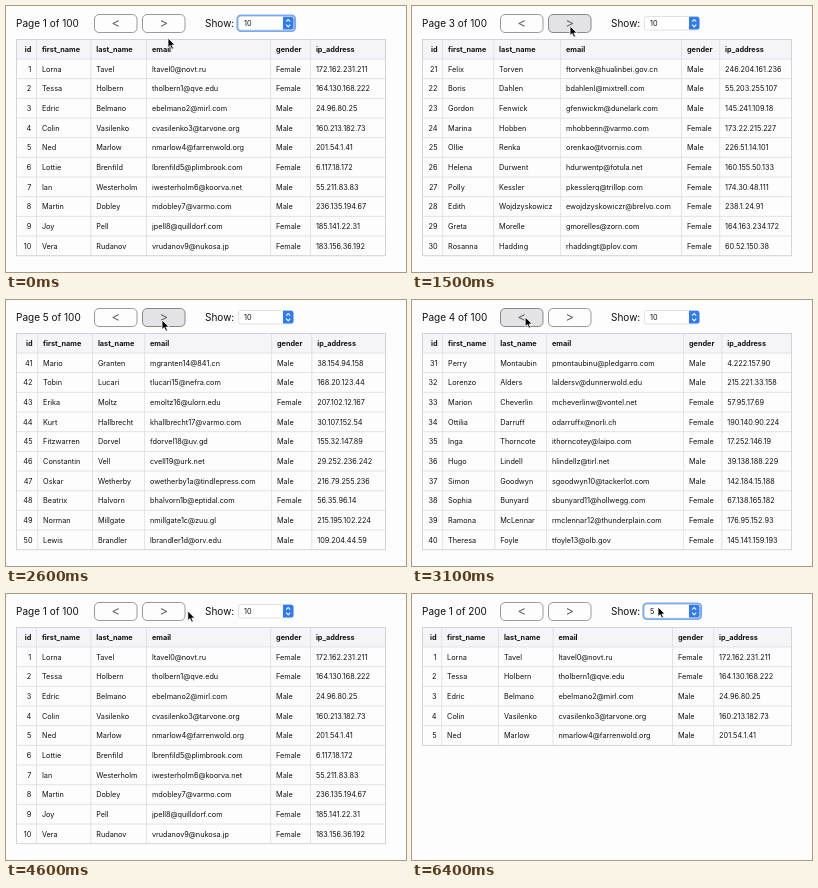
Animation, 400 px wide and 266 px high, one loop 6.5 s. Source, as an HTML page:

```html
<!DOCTYPE html>
<html lang="en">
<head>
<meta charset="utf-8">
<title>Paginated table</title>
<style>
  html, body { margin: 0; width: 100%; height: 100%; overflow: hidden; background: #fdfdfe; }
  svg { display: block; width: 100%; height: 100%; font: 7.3px Inter, "Open Sans", sans-serif; fill: #111; }
  .caption { font-size: 10px; }
  .head { font-weight: 700; }
  .end { text-anchor: end; }
  .button rect { fill: #fdfdfe; stroke: #9a9a9c; }
  .button text { font-size: 13px; fill: #606064; text-anchor: middle; }
  .button.hover rect { fill: #e3e3e5; stroke: #88888b; }
  .grid { fill: none; stroke: #dcdce0; stroke-width: .8; }
  .frame { fill: none; stroke: #cfcfd4; stroke-width: .9; }
</style>
</head>
<body>
<svg viewBox="0 0 400 266" xmlns="http://www.w3.org/2000/svg">
  <text id="counter" class="caption" x="10" y="20.5"></text>
  <g id="prev" class="button"><rect x="88.5" y="8.5" width="42.5" height="18" rx="4.5"/><text x="109.7" y="21.7">&lt;</text></g>
  <g id="next" class="button"><rect x="136.5" y="8.5" width="42.5" height="18" rx="4.5"/><text x="157.7" y="21.7">&gt;</text></g>
  <text class="caption" x="199" y="20.5">Show:</text>
  <rect id="ring" x="231.5" y="9.5" width="57.5" height="15.5" rx="3.5" fill="none" stroke="#79aaf2" stroke-width="2.2"/>
  <rect id="select" x="232.5" y="10.5" width="55" height="13.5" rx="2.5" fill="#fff" stroke="#d6d6da" stroke-width=".7"/>
  <path d="M277 10.8h8q2.4 0 2.4 2.4v8q0 2.4-2.4 2.4h-8z" fill="#2f7cf2"/>
  <path d="M280.2 15.7l2-2.2 2 2.2M280.2 18.7l2 2.2 2-2.2" fill="none" stroke="#fff" stroke-width="1.1"/>
  <text id="size" x="238" y="19.9"></text>
  <g id="tables"></g>
  <path id="cursor" d="M0 0V9.6L2.2 7.6 3.8 11.2 5.5 10.4 3.9 7H7z" fill="#000" stroke="#fff" stroke-width=".8"/>
</svg>
<script>
const LOOP = 6500, TOP = 33.5, HEAD = 19.5, PITCH = 19.67, LEFT = 10.5, RIGHT = 379.5;
const $ = id => document.getElementById(id);

// Column dividers, then records: first name, last name, mail domain, gender, address
const pages = {
  1: [[30.5, 84.8, 140.5, 264.7, 304.5], `
Lorna Tavel novt.ru F 172.162.231.211
Tessa Holbern qve.edu F 164.130.168.222
Edric Belmano mirl.com M 24.96.80.25
Colin Vasilenko tarvone.org M 160.213.182.73
Ned Marlow farrenwold.org M 201.54.1.41
Lottie Brenfild plimbrook.com F 6.117.18.172
Ian Westerholm koorva.net M 55.211.83.83
Martin Dobley varmo.com M 236.135.194.67
Joy Pell quilldorf.com F 185.141.22.31
Vera Rudanov nukosa.jp F 183.156.36.192`],
  2: [[30.5, 85, 144, 268, 307], `
Clara Winslade porrin.com F 84.17.203.66
Piers Hollow tandrel.org M 191.44.120.8
Nora Castell umbrio.net F 23.165.78.204
Jonas Pettigan lovask.com M 140.92.16.133
Ingrid Farlow stellop.com F 208.31.177.52
Hector Munday brindolf.org M 62.219.104.90
Leona Starkey ganvil.edu F 117.8.243.165
Rupert Oswick corvelle.com M 175.126.39.81
Silvia Barton mendrop.net F 49.200.151.17
Conrad Thayler fennolo.com M 221.73.14.248`],
  3: [[30.7, 81.7, 148.6, 269.6, 307.7], `
Felix Torven hualinbei.gov.cn M 246.204.161.236
Boris Dahlen mixtrell.com M 55.203.255.107
Gordon Fenwick dunelark.com M 145.241.109.18
Marina Hobben varmo.com F 173.22.215.227
Ollie Renka tvornis.com M 226.51.14.101
Helena Durwent fotula.net F 160.155.50.133
Polly Kessler trillop.com F 174.30.48.111
Edith Wojdzyskowicz brelvo.com F 238.1.24.91
Greta Morelle zorn.com F 164.163.234.172
Rosanna Hadding plov.com F 60.52.150.38`],
  4: [[30.7, 82.8, 134.6, 271.6, 309.8], `
Perry Montaubin pledgarro.com M 4.222.157.90
Lorenzo Alders dunnerwold.edu M 215.221.33.158
Marion Cheverlin vontel.net F 57.95.17.69
Ottilia Darruff norli.ch F 190.140.90.224
Inga Thorncote laipo.com F 17.252.146.19
Hugo Lindell tirl.net M 39.138.188.229
Simon Goodwyn tackerlot.com M 142.184.15.188
Sophia Bunyard hollwegg.com F 67.138.165.182
Ramona McLennar thunderplain.com F 176.95.152.93
Theresa Foyle olb.gov F 145.141.159.193`],
  5: [[31.7, 86.5, 138.6, 265.6, 305.8], `
Mario Granten 841.cn M 38.154.94.158
Tobin Lucari nefra.com M 168.20.123.44
Erika Moltz ulorn.edu F 207.102.12.167
Kurt Hallbrecht varmo.com M 30.107.152.54
Fitzwarren Dorvel uv.gd M 155.32.147.89
Constantin Vell urk.net M 29.252.236.242
Oskar Wetherby tindlepress.com M 216.79.255.236
Beatrix Halvorn eptidal.com F 56.35.96.14
Norman Millgate zuu.gl M 215.195.102.224
Lewis Brandler orv.edu M 109.204.44.59`]
};
pages.short = [[29.7, 86.5, 141, 260.5, 301.7], pages[1][1].split('\n').slice(0, 6).join('\n')];

function recordCells(line, index) {
  const [first, last, domain, gender, ip] = line.split(' ');
  const mail = (first[0] + last).toLowerCase() + index.toString(36) + '@' + domain;
  return [index + 1, first, last, mail, gender === 'F' ? 'Female' : 'Male', ip];
}

function cellsMarkup(cells, dividers, baseline, cls = '') {
  return cells.map((cell, i) => {
    const x = i ? dividers[i - 1] + 5.4 : dividers[0] - 5.2;
    return `<text class="${cls}${i ? '' : ' end'}" x="${x}" y="${baseline}">${cell}</text>`;
  }).join('');
}

function tableMarkup([dividers, data], offset) {
  const lines = data.trim().split('\n');
  const body = TOP + HEAD, bottom = body + PITCH * lines.length;
  const headings = ['id', 'first_name', 'last_name', 'email', 'gender', 'ip_address'];
  const rules = lines.map((_, i) => `M${LEFT} ${body + PITCH * i}H${RIGHT}`).join('');
  const columns = dividers.map(x => `M${x} ${TOP}V${bottom}`).join('');
  return `<rect x="${LEFT}" y="${TOP}" width="${RIGHT - LEFT}" height="${HEAD}" fill="#f5f5f9"/>
    <path class="grid" d="${rules}${columns}"/>
    <rect class="frame" x="${LEFT}" y="${TOP}" width="${RIGHT - LEFT}" height="${bottom - TOP}"/>` +
    cellsMarkup(headings, dividers, 46.1, 'head') +
    lines.map((line, i) => cellsMarkup(recordCells(line, offset + i), dividers, 65.6 + PITCH * i)).join('');
}

const tables = {};
for (const key in pages) {
  const group = document.createElementNS('http://www.w3.org/2000/svg', 'g');
  group.innerHTML = tableMarkup(pages[key], key === 'short' ? 0 : (key - 1) * 10);
  $('tables').append(group);
  tables[key] = group;
}

const views = [[0, 1], [900, 2], [1400, 3], [2000, 4], [2500, 5], [3000, 4], [3300, 3], [3500, 2], [3700, 1], [5600, 'short']];
const path = [[0, 162, 32], [500, 159, 21], [1500, 158, 20], [2600, 156, 20], [2700, 156, 20], [3000, 113, 17],
  [3800, 117, 17], [4300, 117, 17], [4900, 246, 17], [5100, 246, 17], [5400, 246, 13], [LOOP, 246, 13]];

function cursorAt(t) {
  const i = path.findIndex(([time]) => time > t);
  const [t0, x0, y0] = path[i - 1], [t1, x1, y1] = path[i];
  const p = (t - t0) / (t1 - t0), e = p * p * (3 - 2 * p);
  return [x0 + (x1 - x0) * e, y0 + (y1 - y0) * e];
}

function draw() {
  const t = performance.now() % LOOP;
  const view = views.filter(([time]) => time <= t).pop()[1];
  const [x, y] = cursorAt(t);
  const over = (left, right) => x > left && x < right && y > 8 && y < 27;

  for (const key in tables) tables[key].setAttribute('display', key === String(view) ? 'inline' : 'none');
  $('counter').textContent = view === 'short' ? 'Page 1 of 200' : `Page ${view} of 100`;
  $('size').textContent = t < 5400 ? '10' : '5';
  $('ring').setAttribute('display', t < 900 || t >= 5600 ? 'inline' : 'none');
  $('select').setAttribute('fill', t >= 5400 && t < 5600 ? '#ececee' : '#fff');
  $('prev').classList.toggle('hover', over(88, 131));
  $('next').classList.toggle('hover', over(136, 179));
  $('cursor').setAttribute('transform', `translate(${x} ${y})`);
  requestAnimationFrame(draw);
}
draw();
</script>
</body>
</html>
```
